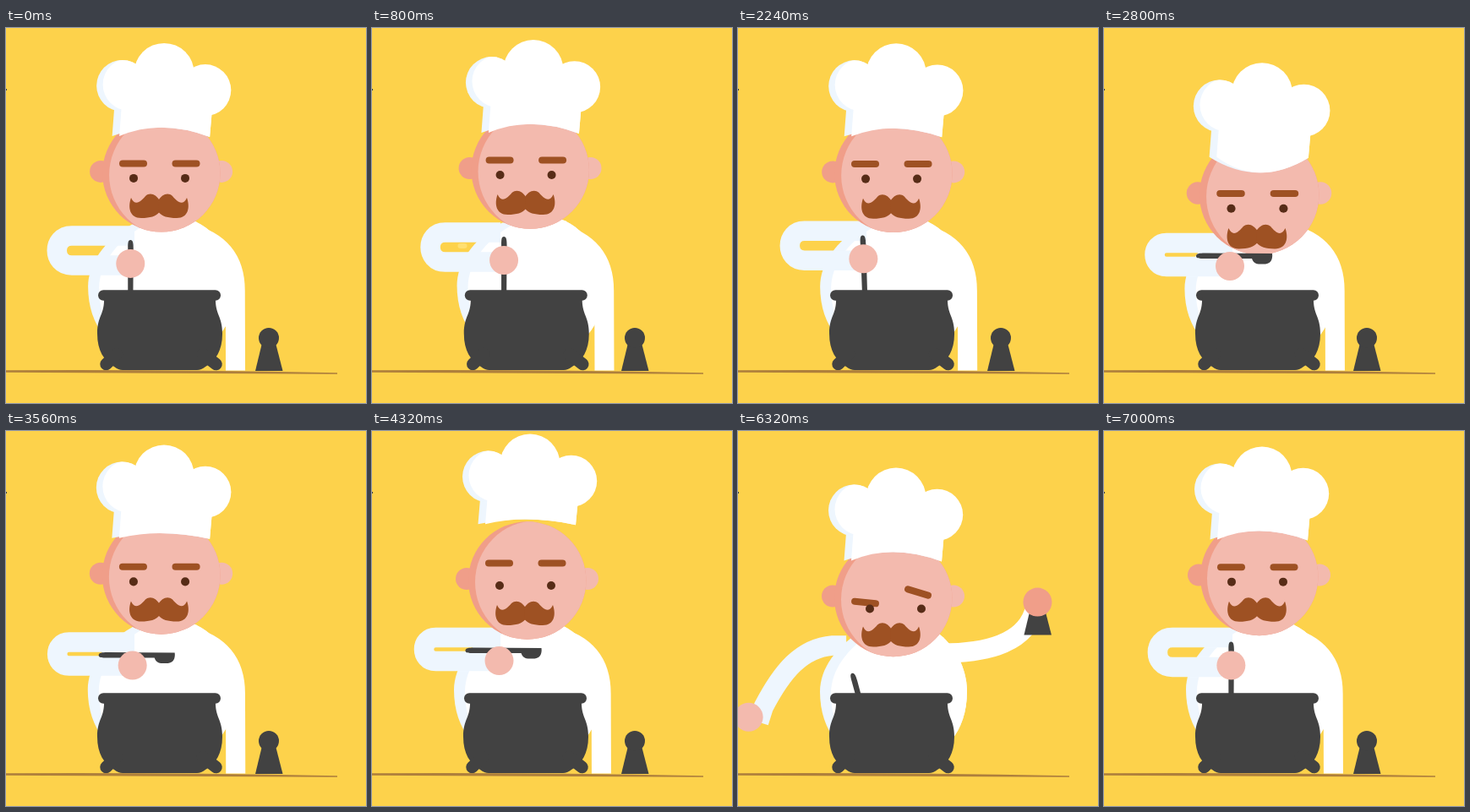
An HTML page with a canvas for the animation above (7.04 s loop, 426 by 444 pixels).

```html
<!DOCTYPE html>
<html lang="en">
<head>
<meta charset="utf-8">
<title>Chef</title>
<style>
html, body { margin: 0; width: 100%; height: 100%; overflow: hidden; background: #fdd24b; }
canvas { display: block; width: 426px; height: 444px; }
</style>
</head>
<body>
<canvas id="stage" width="426" height="444"></canvas>
<script>
const ctx = document.getElementById('stage').getContext('2d');
const LOOP = 7040, BEAT = 440, STEP = 40, TAU = Math.PI * 2;
const YELLOW = '#fdd24b', WHITE = '#fff', SHADE = '#eef6fe', SKIN = '#f3baae',
      BLUSH = '#f09e89', HAIR = '#9e5123', EYE = '#572c17', IRON = '#424242', WOOD = '#ae7f3c';

const mix = (a, b, p) => a + (b - a) * p;
const mixPoint = (a, b, p) => [mix(a[0], b[0], p), mix(a[1], b[1], p)];
const ramp = (t, from, to) => Math.min(1, Math.max(0, (t - from) / (to - from)));
const hump = (t, from, to) => Math.sin(Math.PI * ramp(t, from, to));

function ease(t, from, to) {
  const p = ramp(t, from, to);
  return p * p * (3 - 2 * p);
}

// Rises from 0 to 1 between a and b, falls back between c and d.
const pulse = (t, a, b, c, d) => ease(t, a, b) - ease(t, c, d);

function poseAt(t) {
  const bend = pulse(t, 2200, 2640, 3440, 3600);
  const surprise = pulse(t, 3440, 3700, 4720, 4900);
  const show = pulse(t, 4840, 5160, 6560, 7040);
  const circling = (1 - Math.cos(TAU * (t - 15) / BEAT)) / 2;
  return {
    bend, show,
    stir: circling * (1 - pulse(t, 2200, 2300, 6860, 7000)),
    sway: 10 * circling * (1 - ease(t, 2200, 2300)),
    taste: pulse(t, 2200, 2640, 4720, 5100),
    lift: -10 * surprise - 20 * hump(t, 2200, 2640),
    headY: 25.5 * (bend + show) + 5 * surprise - 8 * hump(t, 3440, 3760),
    faceY: 10 * bend + 7 * show,
    hatUp: 32 * pulse(t, 3600, 3840, 4200, 4480),
    browUp: 9 * pulse(t, 3600, 3680, 4360, 4480),
    sly: pulse(t, 5000, 5300, 6500, 6900),
    spread: pulse(t, 5400, 5580, 6300, 6800),
    reach: pulse(t, 4720, 4960, 6640, 6900),
    raise: pulse(t, 5020, 5380, 6160, 6600)
  };
}

function within(draw) {
  ctx.save();
  draw();
  ctx.restore();
}

function circle(x, y, r, color) {
  ctx.fillStyle = color;
  ctx.beginPath();
  ctx.arc(x, y, r, 0, TAU);
  ctx.fill();
}

function shape(d, color) {
  ctx.fillStyle = color;
  ctx.fill(new Path2D(d));
}

function line(d, color, width, cap = 'butt') {
  ctx.strokeStyle = color;
  ctx.lineWidth = width;
  ctx.lineCap = cap;
  ctx.lineJoin = 'round';
  ctx.stroke(new Path2D(d));
}

function pill(x, y, w, h, angle, color) {
  within(() => {
    ctx.translate(x, y);
    ctx.rotate(angle);
    ctx.fillStyle = color;
    ctx.beginPath();
    ctx.roundRect(-w / 2, -h / 2, w, h, h / 2);
    ctx.fill();
  });
}

function drawBody(s) {
  const torso = 'M150 232C115 252 97 280 97 306C97 330 104 350 116 364L252 364' +
                'C264 350 271 330 271 306C271 266 240 224 200 224Z';
  within(() => {
    ctx.translate(184 + s.sway * 0.9, s.headY * 0.1 - s.sway * 0.3);
    ctx.scale(1 + 0.018 * s.bend, 1);
    ctx.translate(-184, 0);
    shape(torso, SHADE);
    ctx.clip(new Path2D(torso));
    ctx.translate(13, 2);
    shape(torso, WHITE);
  });
}

function drawCrumb(t) {
  const age = (t % (2 * BEAT) - 800) / 1000;
  if (t < 2200 && Math.abs(age) < 0.1) pill(107 - 60 * age, 258, 11, 6, 0, '#ffdf70');
}

function leftArm(s) {
  const dx = 23 * s.stir - s.lift * 0.15, dy = s.lift - 10 * s.stir;
  const x = mix(77.5, 74, s.taste) + dx, y = mix(263.5, 268.5, s.taste) + dy;
  const r = mix(17.5, 14, s.taste), bulge = x - r * 4 / 3;
  const hand = [mix(147, 149, s.taste) + dx, mix(279, 282, s.taste) + dy];
  const tip = [hand[0] - 40 * s.taste, hand[1] - mix(28, 12, s.taste)];
  const bent = [[152, y - r], [x, y - r], [bulge, y - r], [bulge, y + r], [x, y + r], [hand[0] - 10, y + r]];
  const open = [[128, 254], [112, 254], [75, 257], [52, 285], [30, 327], [24, 345]];
  return {
    path: bent.map((point, i) => mixPoint(point, open[i], s.spread)),
    hand: mixPoint(hand, [12, 339], s.spread),
    tip: mixPoint(tip, [135, 287], s.spread),
    angle: mix(mix(Math.PI / 2, 0, s.taste), 1.3, s.spread)
  };
}

function drawLeftSleeve([a, b, c, d, e, f]) {
  line(`M${a}L${b}C${c} ${d} ${e}L${f}`, SHADE, 23.5);
}

function drawSpoon([x, y], angle) {
  within(() => {
    ctx.translate(x, y);
    ctx.rotate(angle);
    shape('M0 0C0 -3 4 -3.5 10 -3.5L90 -3C91 4 88 9 82 9.5L74 9.5C69 9 67 6 66 3L10 3C4 3 0 3 0 0Z', IRON);
  });
}

// A sleeve with one rounded elbow between shoulder and hand.
function rightArm(s) {
  const side = s.sway * 0.9 + 2 * s.bend;
  const swing = 45 * Math.sin(Math.PI * s.raise);
  const blend = (rest, grab, high) => {
    const [x, y] = mixPoint(mixPoint(rest, grab, s.reach), high, s.raise);
    return [x + side, y];
  };
  const shoulder = blend([213, 242], [213, 256], [222, 265]);
  const elbow = blend([271, 256], [290, 268], [322, 268]);
  const hand = blend([271.5, 425], [311, 367], [321, 132]);
  elbow[0] += swing * 0.5;
  hand[0] += swing;
  const length = Math.hypot(hand[0] - elbow[0], hand[1] - elbow[1]);
  const bendEnd = mixPoint(elbow, hand, 55 / length);
  const cuff = mixPoint(elbow, hand, 1 - 16 / length);
  const c1 = mixPoint(shoulder, elbow, 0.65), c2 = mixPoint(elbow, bendEnd, 0.3);
  return { path: `M${shoulder}C${c1} ${c2} ${bendEnd}L${cuff}`, hand };
}

// Held in the hand, dropped on the elbow, bounced up and caught again.
function shakerAt(t, hand) {
  const fall = ramp(t, 5400, 5600), bounce = ramp(t, 5600, 6120);
  const arc = 4 * bounce * (1 - bounce);
  const onElbow = [301, 235];
  if (t < 5020 || t > 6600) return [311, 367];
  if (bounce === 1 || fall === 0) return hand;
  if (fall < 1) return mixPoint(hand, onElbow, fall * fall);
  const [x, y] = mixPoint(onElbow, hand, bounce);
  return [x + 80 * arc, y - 145 * arc];
}

function drawShaker([x, y], turn) {
  within(() => {
    ctx.translate(x, y);
    ctx.rotate(turn);
    shape('M-8 6L8 6L16.5 39L-16 39Z', IRON);
    circle(0, 0, 12, IRON);
  });
}

function aboveTable(draw) {
  within(() => {
    ctx.beginPath();
    ctx.rect(0, 0, 426, 405.5);
    ctx.clip();
    draw();
  });
}

function drawRightArm(t, s) {
  const { path, hand } = rightArm(s);
  const turn = -1.2 * ramp(t, 5400, 5600) - (TAU - 1.2) * ramp(t, 5600, 6120);
  aboveTable(() => line(path, WHITE, 23));
  drawShaker(shakerAt(t, hand), turn);
  aboveTable(() => circle(...hand, 17, BLUSH));
}

function drawSkull() {
  circle(112, 170, 13, BLUSH);
  circle(255, 170, 13, SKIN);
  within(() => {
    circle(183.7, 172, 69.7, BLUSH);
    ctx.clip();
    circle(195, 174, 73, SKIN);
  });
}

function drawFace(s) {
  const half = 'M0.5 204C-3 198 -10 194 -16 199C-21 205 -28 212 -33 201C-37 212 -35 225 -21 225C-10 225 -4 223 0.5 218Z';
  within(() => {
    ctx.translate(-0.75 * s.sway, s.faceY);
    pill(150.5, 160.5 - s.browUp + 10 * s.sly, 33, 8, 0.1 * s.sly, HAIR);
    pill(213, 160.5 - s.browUp - 2 * s.sly, 33, 8, 0.3 * s.sly, HAIR);
    circle(151 + 5 * s.sly, 178, 5, EYE);
    circle(212 + 5 * s.sly, 178, 5, EYE);
    ctx.translate(181, -2 * s.sly);
    shape(half, HAIR);
    ctx.scale(-1, 1);
    shape(half, HAIR);
  });
}

function drawHat(s) {
  const up = s.hatUp / 20, hem = 128 - 3.5 * up, curve = 107 + 57 * s.bend + 6 * up;
  const band = left =>
    `M${left + 2} 60L238 60L243.5 100L241 ${hem + 1}Q183 ${curve} ${left - 1} ${hem}L${left + 1.5} 95Z`;
  within(() => {
    ctx.translate(0.1 * s.sway, -s.hatUp);
    shape(band(126.5), SHADE);
    within(() => {
      circle(137.5, 68.5, 30.5, SHADE);
      ctx.clip();
      circle(145.5, 67, 31, WHITE);
    });
    shape(band(135), WHITE);
    circle(187, 53.5, 35.5, WHITE);
    circle(235.7, 73.7, 30.5, WHITE);
  });
}

function drawHead(s) {
  const grow = 1 + 0.015 * s.bend;
  within(() => {
    ctx.translate(183.5 + 0.9 * s.sway, 172 + s.headY - s.sway);
    ctx.scale(grow, grow);
    ctx.translate(-183.5, -172);
    drawSkull();
    drawFace(s);
    drawHat(s);
  });
}

function drawPot(x) {
  within(() => {
    ctx.translate(x, 0);
    pill(181.5, 316.5, 145, 12.5, 0, IRON);
    shape('M116 318C117 340 108 340 108 362C108 382 116 394 128 401Q133 405 138 405L226 405' +
          'Q231 405 236 401C248 394 256 382 256 362C256 340 247 340 248 318Z', IRON);
    line('M131 386L118.5 398M233 386L248.5 398', IRON, 14.5, 'round');
  });
}

function drawTable() {
  shape('M0 405.3Q170 404 392 408.2L392 409.8Q190 408.8 0 407.8Z', WOOD);
  ctx.fillStyle = IRON;
  ctx.fillRect(0, 72, 1, 2);
}

function render(t) {
  const s = poseAt(t);
  const left = leftArm(s);
  ctx.fillStyle = YELLOW;
  ctx.fillRect(0, 0, 426, 444);
  drawBody(s);
  drawCrumb(t);
  drawLeftSleeve(left.path);
  drawRightArm(t, s);
  drawHead(s);
  drawSpoon(left.tip, left.angle);
  circle(...left.hand, 17, SKIN);
  drawPot(0.2 * s.sway);
  drawTable();
}

function frame() {
  const t = performance.now() % LOOP;
  render(Math.floor(t / STEP) * STEP);
  requestAnimationFrame(frame);
}
frame();
</script>
</body>
</html>
```
